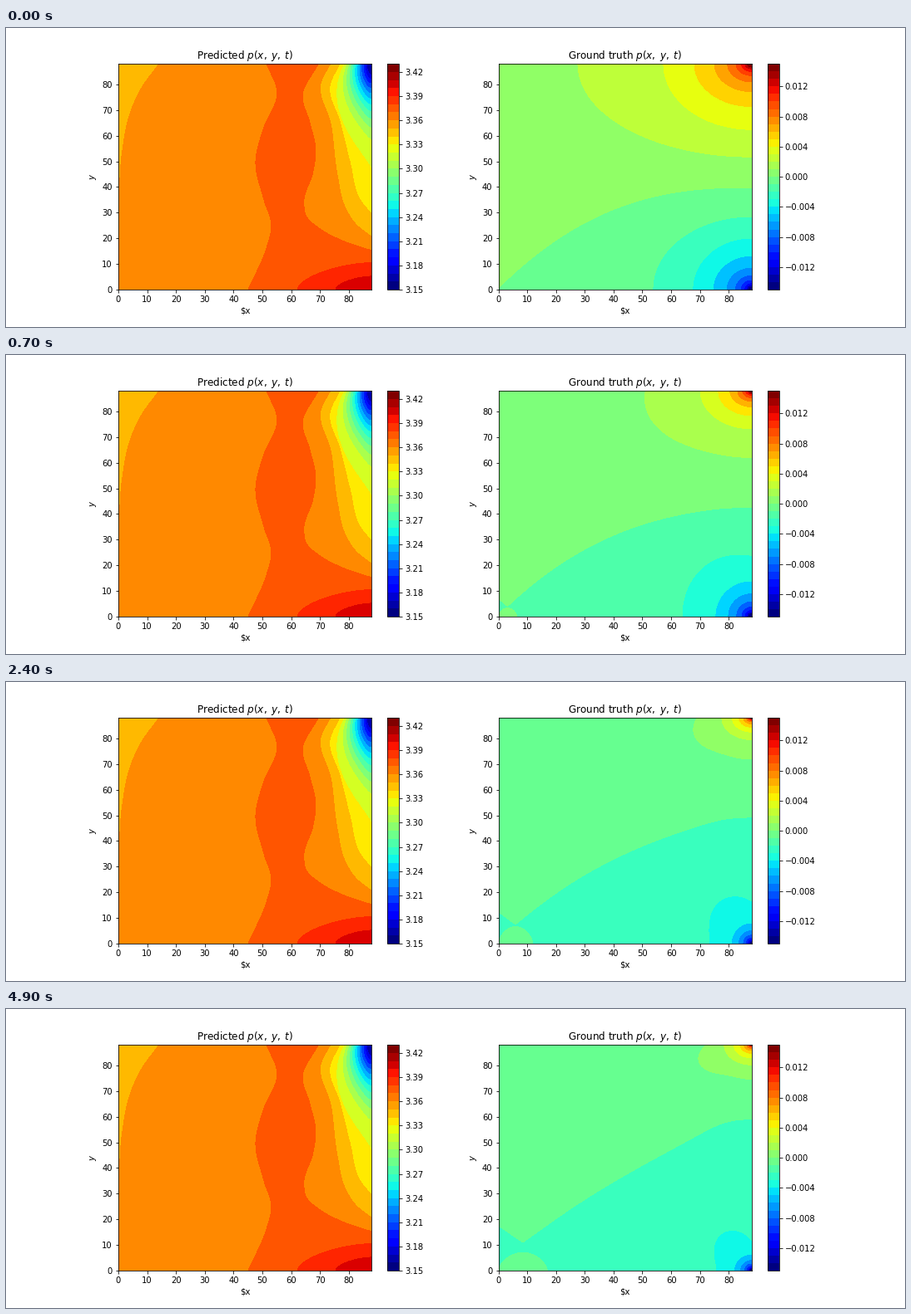
A matplotlib script for the animation above (5 s loop, 1080 by 360 pixels).

```python
import numpy as np
import matplotlib.pyplot as plt
from matplotlib.animation import FuncAnimation
from matplotlib.cm import ScalarMappable
from matplotlib.colors import Normalize
from matplotlib.patches import Polygon

FRAMES, STEP = 50, 100
SIZE = 88
PX, PY = SIZE / 304.36, SIZE / 271.8  # axes units per pixel

plt.rcParams.update({"font.family": "DejaVu Sans", "font.size": 10,
                     "figure.subplot.bottom": 0.125})
jet = plt.get_cmap("jet")
fig, (left, right) = plt.subplots(1, 2, figsize=(15, 5), dpi=72)


def smooth(points, n=14):
    """Cubic Hermite curve through the points, by chord length."""
    p = np.asarray(points, float)
    s = np.r_[0, np.cumsum(np.hypot(*np.diff(p, axis=0).T))]
    m = np.gradient(p, s, axis=0)
    u = np.linspace(0, 1, n)[:, None]
    parts = []
    for i, h in enumerate(np.diff(s)):
        parts.append((2*u**3 - 3*u**2 + 1) * p[i] + (u**3 - 2*u**2 + u) * h * m[i]
                     + (3*u**2 - 2*u**3) * p[i + 1] + (u**3 - u**2) * h * m[i + 1])
    return np.vstack(parts)


def patch(ax):
    return ax.add_patch(Polygon([(0, 0)] * 3, closed=True, ec="none",
                                antialiased=False))


def setup(ax, title, levels, every, start=0):
    ax.set(xlim=(0, SIZE), ylim=(0, SIZE), xlabel="$x", ylabel="$y$",
           xticks=range(0, SIZE, 10), yticks=range(0, SIZE, 10))
    ax.set_title(title + r" $p(x,\;y,\;t)$")
    mids = (levels[1:] + levels[:-1]) / 2
    bar = fig.colorbar(ScalarMappable(Normalize(mids[0], mids[-1]), jet), ax=ax,
                       boundaries=levels, values=mids, ticks=levels[start::every])
    bar.minorticks_off()


setup(left, "Predicted", np.round(np.arange(29) * 0.01 + 3.15, 2), 3)
setup(right, "Ground truth", np.round(np.arange(-15, 16) * 0.001, 3), 4, 3)


# Left panel: still bands, numbered from the main one
def band(n, *runs):
    shape = patch(left)
    shape.set_xy(np.vstack(runs))
    shape.set_facecolor(jet(max(0.765 + 0.052 * n, 0)))


left.set_facecolor(jet(0.765))
band(-1, smooth([(13.6, 88), (7.3, 78), (3.5, 68), (1.2, 55), (0, 20)]), [(0, 88)])
band(1,
     smooth([(51.5, 88), (55.2, 77), (50.3, 62.5), (47.7, 50), (50.6, 35),
             (53.2, 25), (51.7, 17), (45.1, 0)]),
     [(88, 0)],
     smooth([(88, 15.2), (78, 19), (70, 23.7), (65.3, 28.5), (64.4, 34),
             (67.6, 46), (68.5, 54), (66.5, 65), (63.9, 75.5), (69.4, 88)]))
phi = np.linspace(0, np.pi / 2, 40)
for n, a, b in ((2, 25.8, 10.5), (3, 12.5, 5.2)):
    band(n, np.column_stack([88 - a * np.cos(phi)**1.2, b * np.sin(phi)**1.2]),
         [(88, 0)])
band(-1, smooth([(74, 88), (70.5, 80), (74, 65), (76.3, 45), (79, 32.4), (82.4, 26.2),
                 (88, 21)]), [(88, 88)])
band(-2, smooth([(77.2, 88), (73.7, 79), (77.2, 65.7), (80.7, 50), (84.4, 35),
                 (88, 30)]), [(88, 88)])
drop = np.linspace(0, 1, 30)
for k in range(12):
    wide, tall = 9.4 - 1.04 * k**0.85, 40.4 - 11 * k**0.5
    swollen = (1 - drop)**1.2 * (1 + 3.2 * drop)
    mix = (k / 11)**0.5
    w = (1 - mix) * swollen + mix * np.sqrt(1 - drop**2)
    band(-3 - k, np.column_stack([88 - wide * w, 88 - tall * drop]), [(88, 88)])


# Right panel: lobes shrink into both corners while the zero line climbs
def decay(t, start, end, tau):
    return end + (start - end) * np.exp(-t / tau)


def lobe(a, b, swell=0):
    """Offsets in pixels from a corner along a swollen quarter ellipse."""
    r = a * b / np.hypot(b * np.cos(phi), a * np.sin(phi)) * (1 + swell)
    return np.column_stack([r * np.cos(phi) * PX, r * np.sin(phi) * PY])


def top_lobe(k, t):
    if k == 1:
        swell = 0.13 * t * np.sin(2 * phi) * np.cos(phi)**6
        return lobe(decay(t, 209, 53, 0.95), decay(t, 112, 40, 1.2), swell)
    q = 0.65**(k - 2)
    return lobe(q * decay(t, 106, 33, 0.75), q * decay(t, 79, 24, 0.75))


def low_lobe(k, t):
    if k == 1:
        swell = 0.14 * t * np.sin(2 * phi) * np.sin(phi)
        return lobe(decay(t, 118, 41, 1.15), decay(t, 87, 25, 2.6), swell)
    q = 0.65**(k - 2)
    return lobe(q * decay(t, 70, 20, 0.9), q * decay(t, 61, 18, 1.2))


def zero_line(x, t):
    u = x / 79
    rise = u**2.6 / (1 + u**26)**0.1
    return 39.5 * (1 - (1 - x / SIZE)**2.5) + 3.95 * t * rise


low, bump = patch(right), patch(right)
highs = [patch(right) for _ in range(10)]
lows = [patch(right) for _ in range(9)]


def draw(i):
    t = i * STEP / 1000
    below = 10 if t < 0.5 else 9
    above = 10 if t < 1.2 else 11

    def put(shape, points, n):
        shape.set_xy(points)
        shape.set_facecolor(jet((below + n) / (below + above - 1)))

    right.set_facecolor(jet(below / (below + above - 1)))

    # notch at the lower left, with a bump of the main band under it
    nx = 8.5 * np.sqrt(t / 4.9)
    ny = nx * (1 + 0.028 * nx)
    x = np.linspace(nx, SIZE, 120)
    y = zero_line(x, t) + (ny - zero_line(nx, t)) * np.exp((nx - x) / 8)
    put(low, np.vstack([[(0, 2 * nx)], np.column_stack([x, y]),
                        [(SIZE, 0), (0, 0)]]), -1)
    arc = np.linspace(0, np.pi, 40)
    put(bump, np.column_stack([nx * (1 - np.cos(arc)),
                               min(0.95 * ny, 7) * np.sin(arc)**1.3]), 0)

    for k, shape in enumerate(highs, 1):
        shape.set_visible(k < above)
        put(shape, np.vstack([SIZE - top_lobe(k, t), [(SIZE, SIZE)]]), k)
    for k, shape in enumerate(lows, 1):
        shape.set_visible(k < below)
        put(shape, np.vstack([(SIZE, 0) + low_lobe(k, t) * (-1, 1), [(SIZE, 0)]]),
            -1 - k)
    return [low, bump, *highs, *lows]


anim = FuncAnimation(fig, draw, frames=FRAMES, interval=STEP, repeat=True,
                     repeat_delay=0, blit=False)
plt.show()
```
